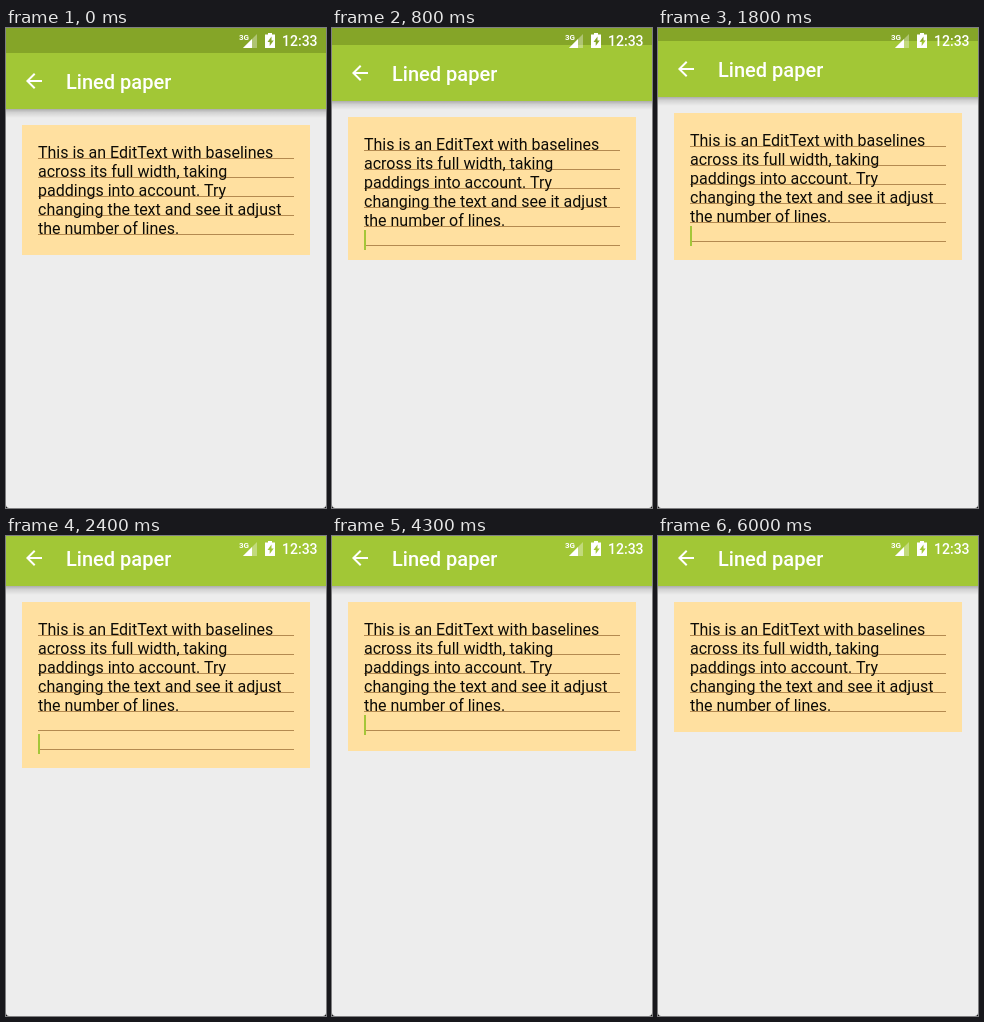
An HTML page that plays this animation: 320x480 px, repeating every 6.1 s.

```html
<!DOCTYPE html>
<html lang="en">
<head>
<meta charset="utf-8">
<title>Lined paper</title>
<style>
  html, body { margin: 0; width: 100%; height: 100%; overflow: hidden; background: #ededed; }
  svg { display: block; width: 320px; height: 480px; }
  text { font-family: Roboto, "Noto Sans", sans-serif; white-space: pre; }
  .medium { font-weight: 500; fill: #fff; }
  .body { font-size: 16px; fill: #0d0b06; }
</style>
</head>
<body>
<svg viewBox="0 0 320 480">
  <defs>
    <linearGradient id="shade" x2="0" y2="1">
      <stop offset="0" stop-color="#000" stop-opacity=".27"/>
      <stop offset=".4" stop-color="#000" stop-opacity=".11"/>
      <stop offset="1" stop-color="#000" stop-opacity="0"/>
    </linearGradient>
    <clipPath id="window"><rect width="320" height="232"/></clipPath>
  </defs>
  <rect width="320" height="480" fill="#ededed"/>

  <g clip-path="url(#window)">
    <g id="page">
      <rect id="card" x="16" y="97" width="288" fill="#ffe0a0"/>
      <g id="rules" fill="#b48a50"></g>
      <g id="copy" class="body"></g>
      <rect id="caret" width="2" height="20" fill="#a4c639"/>
      <rect y="81" width="320" height="9" fill="url(#shade)"/>
      <rect y="25" width="320" height="56" fill="#a2c736"/>
      <rect width="320" height="25" fill="#85a528"/>
      <path transform="translate(16 41)" fill="#fff" d="M20 11H7.83l5.59-5.59L12 4l-8 8 8 8 1.41-1.41L7.83 13H20z"/>
      <text class="medium" x="60" y="61" font-size="20">Lined paper</text>
    </g>
  </g>

  <!-- status icons stay put while the page pans -->
  <g fill="#fff">
    <text x="233" y="12" font-size="8" font-weight="700" textLength="">3G</text>
    <path d="M251 6V20H237Z" opacity=".35"/>
    <path d="M246 11V20H237Z"/>
    <path fill-rule="evenodd" d="M262 5h4v1.5h3V20h-10V6.500h3z M265.500 8.500l-4 5.500h2.200v4l4-5.500h-2.200z"/>
    <text class="medium" x="276" y="18" font-size="14">12:33</text>
  </g>
  <path d="M0 477Q0 480 3 480H0ZM320 477Q320 480 317 480H320Z"/>
</svg>
<script>
const LOOP = 6100, STEP = 100;
const LEFT = 32, FIRST = 130, PITCH = 19;
const COPY = [
  "This is an EditText with baselines",
  "across its full width, taking",
  "paddings into account. Try",
  "changing the text and see it adjust",
  "the number of lines."
];

// [start in ms, value], each held until the next
const pan = [[0, 0], [800, 8], [900, 12], [2400, 31]];
const lineCount = [[0, 5], [800, 6], [2400, 7], [4300, 6], [5400, 5]];
const caretOn = [
  [0, 0], [100, 1], [600, 0], [800, 1], [1300, 0], [1800, 1], [2700, 0],
  [3200, 1], [3700, 0], [4200, 1], [4800, 0], [5300, 1], [6000, 0]
];

const $ = id => document.getElementById(id);
const baseline = i => FIRST + i * PITCH;
const at = (track, t) => track.reduce((value, [start, v]) => t >= start ? v : value, 0);

function add(parent, tag, attrs, text = "") {
  const el = document.createElementNS("http://www.w3.org/2000/svg", tag);
  for (const key in attrs) el.setAttribute(key, attrs[key]);
  el.textContent = text;
  parent.append(el);
  return el;
}

COPY.forEach((line, i) => add($("copy"), "text", { x: LEFT, y: baseline(i) }, line));
const rules = Array.from({ length: 7 }, (_, i) =>
  add($("rules"), "rect", { x: LEFT, y: baseline(i), width: 256, height: 1 }));

function draw(ms) {
  const t = Math.floor(ms % LOOP / STEP) * STEP;
  const lines = at(lineCount, t);
  $("page").setAttribute("transform", `translate(0 ${-at(pan, t)})`);
  $("card").setAttribute("height", 35 + lines * PITCH);
  rules.forEach((rule, i) => rule.setAttribute("visibility", i < lines ? "visible" : "hidden"));
  const caret = $("caret");
  caret.setAttribute("x", lines > COPY.length ? LEFT : 171);
  caret.setAttribute("y", baseline(lines - 1) - 15);
  caret.setAttribute("visibility", at(caretOn, t) ? "visible" : "hidden");
}

let origin;
function tick(now) {
  origin ??= now;
  draw(now - origin);
  requestAnimationFrame(tick);
}
draw(0);
requestAnimationFrame(tick);
</script>
</body>
</html>
```
